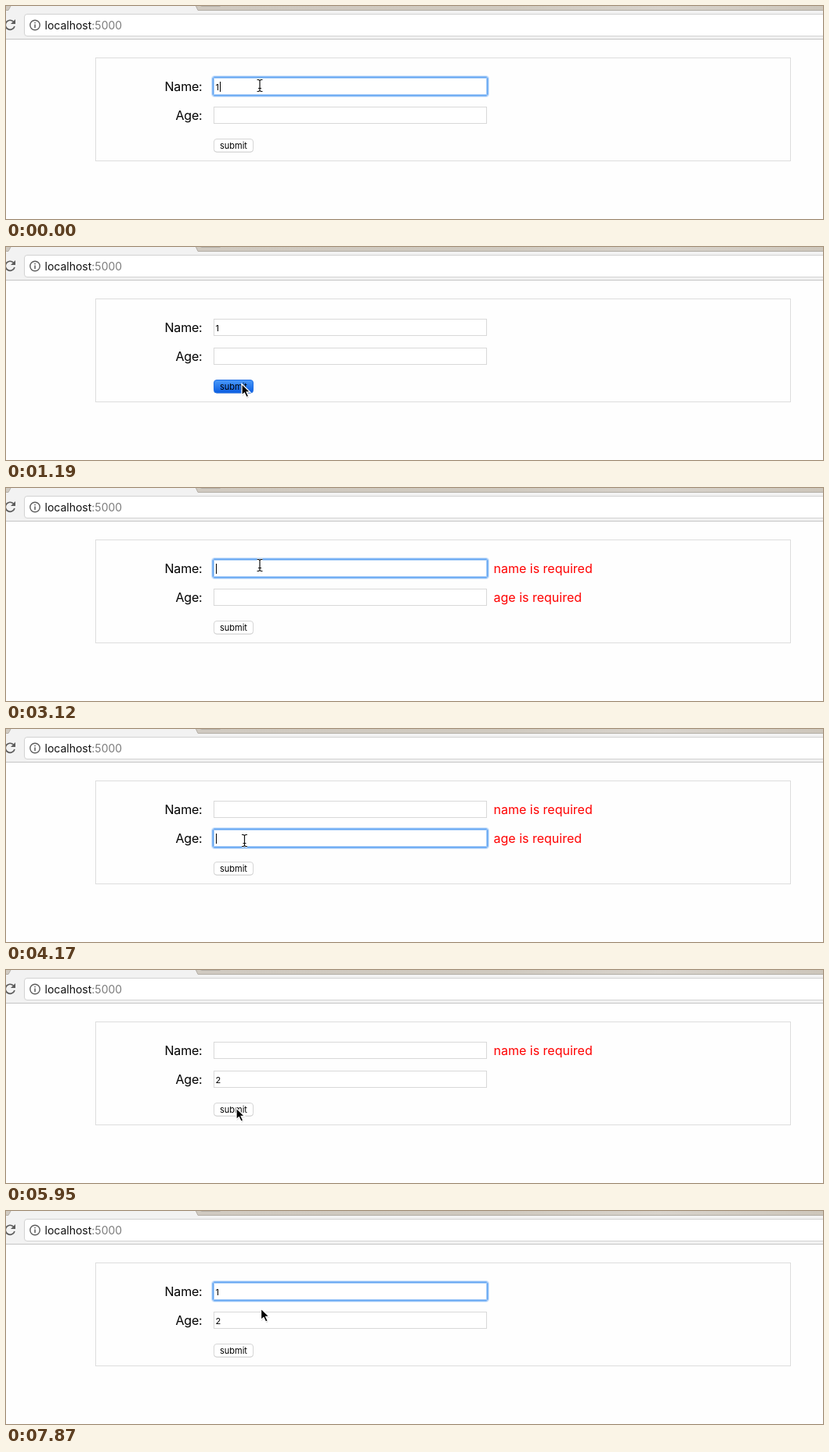
These frames come from a looping animation (1043 px wide and 273 px high, 8 s). An HTML page:

```html
<!DOCTYPE html>
<html lang="en">
<head>
<meta charset="utf-8">
<title>Form validation</title>
<style>
  html, body { margin: 0; height: 100%; overflow: hidden; background: #fefefe; }
  svg { display: block; width: 1043px; height: 273px; font: 16px Inter, sans-serif; }
  .label { text-anchor: end; letter-spacing: -.2px; }
  .error { fill: #f00; }
  .small { font-size: 11px; }
  .ring rect { fill: none; }
  .caret { fill: #000; }
</style>
</head>
<body>
<svg viewBox="0 0 1043 273">
  <defs>
    <linearGradient id="tabs">
      <stop offset=".25" stop-color="#d0cac1"/><stop offset=".6" stop-color="#cfc9bf"/>
      <stop offset=".8" stop-color="#d8d3cc"/><stop offset="1" stop-color="#cdc6bb"/>
    </linearGradient>
    <linearGradient id="blue" x2="0" y2="1">
      <stop stop-color="#4a9afa"/><stop offset="1" stop-color="#0a5ce0"/>
    </linearGradient>
    <g id="ring" class="ring">
      <rect x="262.5" y="-2.5" width="354" height="27" rx="3.5" stroke="#d3e6fc"/>
      <rect x="263.5" y="-1.5" width="352" height="25" rx="2.5" stroke="#8abcf6"/>
      <rect x="264.5" y="-.5" width="350" height="23" rx="1.5" stroke="#66a7f2"/>
      <rect x="265.5" y=".5" width="348" height="21" stroke="#a6ccf8"/>
    </g>
  </defs>

  <!-- browser bar -->
  <rect width="1043" height="42" fill="#f2f2f2"/>
  <path d="M0 0H6L3 5H0ZM242 0H1043V5H245Z" fill="url(#tabs)"/>
  <path d="M242.500 0L245 5.500H1043M0 5.500H3L6 0" fill="none" stroke="#b3aea6"/>
  <path d="M248 0H274L273 1H250Z" fill="#b5b0a9"/>
  <path d="M0 42.500H1043" stroke="#c5c5c5"/>
  <rect x="23.500" y="10.500" width="1030" height="28" rx="3.500" fill="#fff" stroke="#d2d2d2"/>
  <g fill="none" stroke="#5c5c5c" stroke-width="1.700">
    <path d="M9.500 20A6 6 0 1 0 11 26"/>
    <circle cx="37" cy="24.500" r="6.200" stroke-width="1.400"/>
    <path d="M37 23.500V28M37 20.700V22.300" stroke-width="1.500"/>
  </g>
  <path d="M12 17V23H6Z" fill="#5c5c5c"/>
  <text x="49.500" y="29.500" font-size="14" fill="#111">localhost<tspan fill="#7c7c7c">:5000</tspan></text>

  <!-- form -->
  <rect x="114.500" y="66.500" width="887" height="132" fill="none" stroke="#ddd"/>
  <g id="fields"></g>
  <rect x="265.500" y="171" width="50" height="16.500" rx="3.500" fill="#ccc"/>
  <rect id="button" x="265.500" y="170.500" width="50" height="16.500" rx="3.500"/>
  <text class="small" x="273" y="183">submit</text>

  <g id="beam" fill="none">
    <path d="M-3.500-7.500H-1.500L0-6.500L1.500-7.500H3.500M0-6.500V6.500M-3.500 7.500H-1.500L0 6.500L1.500 7.500H3.500M-2 3.500H2" stroke="#fff" stroke-width="2.400"/>
    <path d="M-3.500-7.500H-1.500L0-6.500L1.500-7.500H3.500M0-6.500V6.500M-3.500 7.500H-1.500L0 6.500L1.500 7.500H3.500M-2 3.500H2" stroke="#111" stroke-width="1.200"/>
  </g>
  <g id="arrow">
    <path d="M0 0V14.500L3.400 11.500L6 17L8.700 15.800L6.200 10.500H10.800Z" fill="#000" opacity=".15" transform="translate(.5 1.500)"/>
    <path d="M0 0V14.500L3.400 11.500L6 17L8.700 15.800L6.200 10.500H10.800Z" stroke="#fff" stroke-width="1.300"/>
  </g>
</svg>
<script>
const LOOP = 8000;
const $ = id => document.getElementById(id);

// Spans are [from, to) pairs in ms.
const fields = [
  { label: 'Name:', y: 92, text: '1', error: 'name is required', caretX: 273,
    filled: [[0, 3120], [7430, LOOP]],
    failed: [[3120, 7430]],
    focus: [[0, 1190], [2230, 4170], [6680, LOOP]],
    caret: [[0, 300], [740, 1190], [2230, 2680], [3120, 3570], [6680, 7130], [7430, 7870]] },
  { label: 'Age:', y: 129, text: '2', error: 'age is required', caretX: 275,
    filled: [[4620, LOOP]],
    failed: [[1340, 5950]],
    focus: [[4170, 5800]],
    caret: [[4170, 5060], [5500, 5800]] },
];
const pressed = [[1190, 1340], [5800, 5950]];

// Pointer: time, x, y, and the shape it has there.
const pointer = [
  [0, 324, 102, 'beam'], [300, 324, 104, 'beam'], [450, 321, 112, 'beam'],
  [600, 315, 138, 'beam'], [740, 309, 158, 'arrow'], [890, 304, 179, 'arrow'],
  [1040, 301, 177, 'arrow'], [1190, 301, 175.5, 'arrow'],
  [1490, 302, 173, 'arrow'], [1640, 306, 158, 'arrow'], [1790, 314, 138, 'beam'],
  [1930, 321, 116, 'arrow'], [2080, 324, 99, 'beam'],
  [3570, 322, 118, 'arrow'], [3720, 314, 150.500, 'arrow'],
  [4020, 305, 145, 'beam'], [4170, 304.500, 143, 'beam'],
  [5210, 302, 155, 'arrow'], [5360, 297, 170, 'arrow'], [5500, 294, 177, 'arrow'],
  [6240, 301, 164, 'arrow'], [6390, 314, 137, 'beam'], [6530, 324, 110, 'beam'],
  [6680, 326, 105, 'beam'], [7870, 325.500, 125, 'arrow'],
];

$('fields').innerHTML = fields.map(({ label, y, text, error }) => `
  <text class="label" x="250.500" y="${y + 17}">${label}</text>
  <rect x="265.500" y="${y + .5}" width="348" height="21" fill="#fff" stroke="#d9d9d9"/>
  <use class="focus" href="#ring" y="${y}"/>
  <text class="filled small" x="267.500" y="${y + 16}">${text}</text>
  <rect class="caret" y="${y + 5}" width="1" height="13"/>
  <text class="failed error" x="622.500" y="${y + 17}">${error}</text>`).join('');

const within = (spans, t) => spans.some(([from, to]) => t >= from && t < to);
const show = (node, on) => node.setAttribute('visibility', on ? 'visible' : 'hidden');

function draw(t) {
  fields.forEach((field, i) => {
    for (const part of ['focus', 'filled', 'caret', 'failed']) {
      show(document.querySelectorAll('#fields .' + part)[i], within(field[part], t));
    }
    const x = within(field.filled, t) ? field.caretX : 268;
    document.querySelectorAll('.caret')[i].setAttribute('x', x);
  });

  const down = within(pressed, t);
  $('button').setAttribute('fill', down ? 'url(#blue)' : '#fff');
  $('button').setAttribute('stroke', down ? '#1f6fe6' : '#d6d6d6');

  const [, x, y, shape] = pointer.findLast(step => step[0] <= t);
  for (const id of ['beam', 'arrow']) show($(id), id === shape);
  $(shape).setAttribute('transform', `translate(${x} ${y})`);
}

function tick() {
  draw(performance.now() % LOOP);
  requestAnimationFrame(tick);
}
tick();
</script>
</body>
</html>
```
